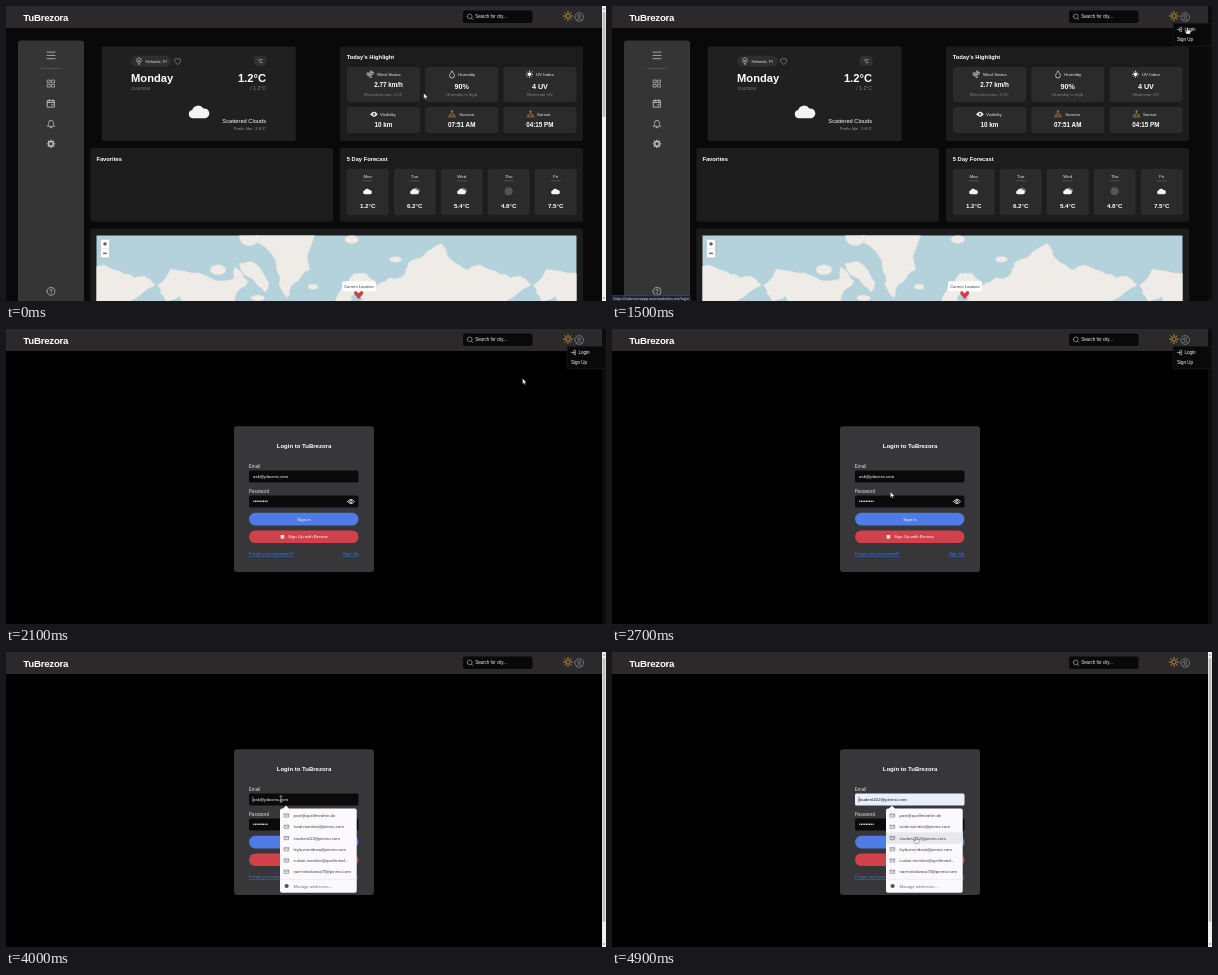
These frames come from a looping animation (600 px wide and 295 px high, 5 s). An HTML page:

```html
<!DOCTYPE html>
<html lang="en">
<head>
<meta charset="utf-8">
<title>Weather dashboard</title>
<style>
html, body { margin: 0; width: 100%; height: 100%; overflow: hidden; background: #000; }
svg { display: block; width: 100vw; height: 100vh; }
text { font-family: "Liberation Sans", Arial, sans-serif; white-space: pre; }
.ui { font-family: "Open Sans", "Noto Sans", sans-serif; }
</style>
</head>
<body>
<svg id="stage" viewBox="0 0 600 295" xmlns="http://www.w3.org/2000/svg"></svg>
<script>
const LOOP = 5000, STEP = 100;
const BRAND = "TuBrezora";
const MAILS = [
  "post@quellmirafen.de", "tural.meridov@pinmo.com", "student222@pinmo.com",
  "leyla.meridova@pinmo.com", "ruslan.meridov@quellmiraf...", "narmintalizova70@pinmo.com"
];
const HINT = "ask@placera.com";
const ROW_TOP = 157.9, ROW_H = 11.25;

// Drawing helpers that return SVG markup
const box = (x, y, w, h, fill, r = 0, more = "") =>
  `<rect x="${x}" y="${y}" width="${w}" height="${h}" rx="${r}" fill="${fill}" ${more}/>`;
const txt = (x, y, s, size, fill = "#fff", more = "") =>
  `<text x="${x}" y="${y}" font-size="${size}" fill="${fill}" ${more}>${s}</text>`;
const mid = 'text-anchor="middle"', end = 'text-anchor="end"', bold = 'font-weight="700"';
const dot = (x, y, r, fill) => `<circle cx="${x}" cy="${y}" r="${r}" fill="${fill}"/>`;
const icon = (x, y, d, stroke = "#ddd", w = .7, fill = "none", s = 1) =>
  `<path transform="translate(${x} ${y}) scale(${s})" d="${d}" fill="${fill}" stroke="${stroke}" stroke-width="${w}" stroke-linecap="round" stroke-linejoin="round"/>`;
const group = (id, body) => `<g id="${id}">${body}</g>`;
const ring = r => `M${-r} 0a${r} ${r} 0 1 0 ${2 * r} 0a${r} ${r} 0 1 0 ${-2 * r} 0`;

function rays(r1, r2, n = 8) {
  let d = "";
  for (let i = 0; i < n; i++) {
    const a = i * 2 * Math.PI / n, c = Math.cos(a), s = Math.sin(a);
    d += `M${(r1 * c).toFixed(2)} ${(r1 * s).toFixed(2)}L${(r2 * c).toFixed(2)} ${(r2 * s).toFixed(2)}`;
  }
  return d;
}

const CLOUD = "M-6.5 6a4.2 4.2 0 0 1-.3-8.3A6.2 6.2 0 0 1 4.4-3.6 4.9 4.9 0 0 1 6.4 6Z";
const EYE = "M-3.4 0Q0-4.6 3.4 0Q0 4.6-3.4 0Z";
const RISE = "M-3.4 2.8H3.4M-2.9 1.2H-2M2 1.2H2.9M-1.6 1.2a1.6 1.6 0 0 1 3.2 0M0-3.2V-1.5M-1-2.3L0-3.2L1-2.3";
const cloud = (x, y, s, fill = "#f4f4f4") => icon(x, y, CLOUD, "none", 0, fill, s);

// Rough outlines as longitude, latitude pairs
const EURASIA = [5,50, 5,62, 13,66, 20,70, 31,70, 41,67, 34,66, 44,66, 54,68.5, 67,69, 72,73, 87,75,
  104,77.7, 113,74, 130,71, 140,72.5, 160,69.7, 180,69, 190,66, 178,62.5, 163,58, 163,50];
const AMERICA = [-168,65.7, -156,71.3, -128,70, -95,68, -94,72, -81,67, -94,59, -94,50, -140,50, -147,60.8, -160,57, -165,62];
const GREENLAND = [-73,78, -54,71, -52,66, -43,60, -38,66, -22,71, -18,82, -66,82];
const BAFFIN = [-90,73, -78,73.5, -61,66.5, -65,62.5, -73,66];
const BALTIC = [17,58, 18,61, 25,65.5, 22,61, 30,59.5];
// Islands: longitude, latitude, half width, half height in px
const ISLES = [[60, 74, 6, 3], [-19, 65, 5, 2.6], [18, 78.5, 7, 4], [-110, 71, 8, 5], [-80, 79, 10, 9], [-72, 60, 7, 3]];
const PX = 1.044;

let seed = 7;
const rand = () => (seed = seed * 16807 % 2147483647) / 2147483647;
const merc = lat => Math.log(Math.tan(Math.PI / 4 + lat * Math.PI / 360));
const place = (lon, lat) => [353 + (lon - 25) * PX, 292 - (merc(lat) - merc(60)) * PX * 180 / Math.PI];

// Splits an edge and pushes its middle sideways, so that coasts look ragged
function ragged(a, b, depth) {
  if (!depth) return [b];
  const k = (rand() - .5) * .3;
  const m = [(a[0] + b[0]) / 2 - (b[1] - a[1]) * k, (a[1] + b[1]) / 2 + (b[0] - a[0]) * k];
  return [...ragged(a, m, depth - 1), ...ragged(m, b, depth - 1)];
}

function coast(line) {
  const points = [];
  for (let i = 0; i < line.length; i += 2) points.push(place(line[i], line[i + 1]));
  const edge = points.flatMap((p, i) => ragged(p, points[(i + 1) % points.length], 2));
  return "M" + edge.map(p => p.map(v => v.toFixed(1)).join(" ")).join("L") + "Z";
}

function map() {
  const land = 'fill="#efebe7" stroke="#d3d6d4" stroke-width=".4"';
  const isles = ISLES.map(([lon, lat, rx, ry]) => {
    const [x, y] = place(lon, lat);
    return `<ellipse cx="${x}" cy="${y}" rx="${rx}" ry="${ry}" ${land}/>`;
  }).join("");
  const world = `<path d="${[EURASIA, AMERICA, GREENLAND, BAFFIN].map(coast).join("")}" ${land}/>` + isles +
    `<path d="${coast(BALTIC)}" fill="#b3d2dc"/>`;
  const copies = [-1, 0, 1].map(k => `<g transform="translate(${k * 360 * PX} 0)">${world}</g>`).join("");
  return box(84.5, 222.5, 492.5, 80, "#1c1c1d", 2) +
    `<clipPath id="frame"><rect x="90.5" y="229.5" width="480" height="66"/></clipPath>` +
    `<g clip-path="url(#frame)">${box(90, 229, 481, 67, "#b3d2dc")}${copies}</g>` +
    box(94.3, 233.2, 9.4, 18.8, "#fff", 1, 'stroke="#a9a9a9" stroke-width=".6"') +
    `<path d="M94.5 242.6h9" stroke="#ccc" stroke-width=".4"/>` +
    icon(99, 237.9, "M-1.6 0H1.6M0-1.6V1.6", "#111", .8) + icon(99, 247.3, "M-1.6 0H1.6", "#111", .8) +
    icon(352.7, 287.5, "M0 5.2L-3.8 .8A2.2 2.2 0 0 1 0-2A2.2 2.2 0 0 1 3.8 .8Z", "#a92732", .4, "#d93a45") +
    `<path d="M350 284.5h5l-2.5 3z" fill="#fff"/>` +
    box(336, 275.2, 34, 10, "#fff", 1.8) + txt(353, 281.7, "Current Location", 4, "#333", mid);
}

function highlights() {
  const cards = [
    ["Wind Status", "2.77 km/h", "Wind direction: 274°", 30],
    ["Humidity", "90%", "Humidity is high", 33],
    ["UV Index", "4 UV", "Moderate UV", 32.5],
    ["Visibility", "10 km", "", 33],
    ["Sunrise", "07:51 AM", "", 34],
    ["Sunset", "04:15 PM", "", 33.5]
  ];
  return box(334, 40.5, 243, 94.5, "#1c1c1d", 2) +
    txt(340.7, 53.2, "Today's Highlight", 5.75, "#fff", bold) +
    cards.map(([name, value, note, dx], i) => {
      const x = 341 + i % 3 * 78.2, y = i < 3 ? 61 : 101, c = x + 36.5;
      const big = i === 1 || i === 2;
      return box(x, y, 73, note ? 35 : 26, "#2b2b2c", 3) +
        txt(x + dx, y + 8.7, name, 4.4, "#eee") +
        txt(c + (i ? 0 : 5), y + (big ? 21.7 : 20), value, big ? 7.2 : 6.3, "#fff", bold + " " + mid) +
        txt(c, y + 29.2, note, 4.4, "#858585", mid);
    }).join("") +
    icon(364, 68, "M-3-1H1.2a1 1 0 1 0-1-1.2M-3 .4H2.4a1.1 1.1 0 1 0-1-1.4M-2 1.8H.6a.9.9 0 1 1-.8 1.1", "#eee") +
    icon(446, 68.6, "M0-3.3C1.5-1.4 2.4-.2 2.4 1a2.4 2.4 0 0 1-4.8 0C-2.4-.2-1.5-1.4 0-3.3Z", "#eee") +
    dot(523.5, 68.2, 1.8, "#fff") + icon(523.5, 68.2, rays(2.5, 3.2), "#fff") +
    icon(368, 108.2, EYE, "#fff", .5, "#fff") + dot(368, 108.2, 1.2, "#2b2b2c") + dot(368, 108.2, .5, "#fff") +
    icon(446, 108, RISE, "#d6a83f", .6) + icon(524.5, 108, RISE, "#d6a83f", .6);
}

function forecast() {
  const days = [["Mon", "1.2°C"], ["Tue", "6.2°C"], ["Wed", "5.4°C"], ["Thu", "4.8°C"], ["Fri", "7.5°C"]];
  return box(334, 142, 243, 73.5, "#1c1c1d", 2) +
    txt(340.7, 155, "5 Day Forecast", 5.75, "#fff", bold) +
    days.map(([day, temp], i) => {
      const c = 361.7 + i * 47;
      const sky = i === 3 ? dot(c, 185.3, 4, "#555") :
        (i === 1 || i === 2 ? cloud(c + 1.6, 184, .36, "#777") : "") + cloud(c - .2, 185.6, .43);
      return box(c - 21, 162.7, 42, 46.5, "#2b2b2c", 3) +
        txt(c, 171.8, day, 4.4, "#eee", mid) +
        box(c - 5, 174.6, 10, .6, "#666") + sky +
        txt(c, 202, temp, 6.2, "#fff", bold + " " + mid);
    }).join("");
}

function today() {
  return box(95.7, 40.5, 194, 94.5, "#202021", 2) +
    box(125, 49.7, 40.5, 11, "#2e2e2f", 5.5) +
    icon(133, 55, "M0 3.2C-1.5 1.4-2.3.3-2.3-.8a2.3 2.3 0 0 1 4.6 0C2.3.3 1.5 1.4 0 3.2Z" + ring(.6), "#ddd", .6) +
    txt(139.5, 56.7, "Helsinki, FI", 4.3, "#eee") +
    icon(171.6, 55.2, "M0 3.2L-3 .2A2 2 0 0 1 0-2.2A2 2 0 0 1 3 .2Z", "#aaa", .6) +
    box(247.7, 50, 13, 10, "#303031", 4) + txt(254.2, 56.7, "°C", 4.5, "#eee", mid) +
    txt(125, 76.2, "Monday", 11.2, "#fff", bold) + txt(125, 83.7, "11/4/2024", 4.4, "#858585") +
    txt(260, 76.2, "1.2°C", 11.2, "#fff", bold + " " + end) + txt(260, 83.9, "/ 1.2°C", 5.1, "#858585", end) +
    cloud(193, 106.2, 1) +
    txt(260, 117.2, "Scattered Clouds", 5.7, "#fff", end) + txt(260, 124.2, "Feels like -1.8°C", 4.4, "#999", end);
}

function sidebar() {
  const g = "#c2c2c2", cell = "h2.7v2.7h-2.7z";
  return box(12, 34.6, 66, 270, "#353535", 3) +
    icon(45, 49.4, "M-4-3.3H4M-4 0H4M-4 3.3H4", g, .8) +
    box(35, 62.2, 20, .6, "#666") +
    icon(45, 77.6, ["M-3.5-3.5", "M.8-3.5", "M-3.5.8", "M.8.8"].map(m => m + cell).join(""), g) +
    icon(45, 97.6, "M-3.4-3H3.4V3.5H-3.4ZM-3.4-1.1H3.4M-1.8-4V-2.4M1.8-4V-2.4M.5 1.2H2", g, .9) +
    icon(45, 117.8, "M-3.4 2.2C-2.3 1-2.5.2-2.4-1a2.4 2.4 0 0 1 4.8 0C2.5.2 2.3 1 3.4 2.2ZM-.9 3.8H.9", g, .8) +
    icon(45, 137.8, ring(2.3) + rays(2.9, 3.7), g, 1.3) +
    icon(45, 285.3, ring(4) + "M-1.2-1a1.2 1.2 0 1 1 1.7 1.1Q0 .4 0 1M0 2.1V2.2", g);
}

const scrollbar = (id, thumb) => group(id,
  box(596, 0, 4, 295, "#f0f0f0") + box(596.7, 6, 2.6, thumb, "#bdbdbd", 1.2) +
  `<path d="M596.9 3.6h2.2l-1.1-1.8zM596.9 291.4h2.2l-1.1 1.8z" fill="#777"/>`);

const dashboard = () => group("dashboard",
  box(0, 0, 600, 295, "#090909") + sidebar() + today() + highlights() +
  box(84.5, 142, 242.5, 73.5, "#1c1c1d", 2) + txt(90.4, 155, "Favorites", 5.75, "#fff", bold) +
  forecast() + map());

const login = () => group("login",
  box(0, 0, 600, 295, "#000") + box(228, 97.3, 140, 145.7, "#373639", 3) +
  txt(298, 119, "Login to " + BRAND, 6, "#fff", bold + " " + mid) +
  txt(242.8, 138.6, "Email", 4.6, "#ddd") +
  box(243, 141.4, 109.5, 12.2, "#0a0a0a", 1.5, 'id="field"') +
  txt(247, 149.1, HINT, 4.4, "#fff", 'id="mail"') +
  box(246.7, 144.6, .5, 5.8, "#ddd", 0, 'id="caret"') +
  txt(242.8, 163.6, "Password", 4.6, "#ddd") +
  box(243, 166.4, 109.5, 12.2, "#0a0a0a", 1.5) + txt(247, 173.6, "•••••••••", 4.7) +
  icon(345, 172.5, EYE + ring(1.2), "#eee", .8) +
  box(243, 183.8, 109.5, 12.6, "#4f7be6", 6.3) + txt(298, 191.7, "Sign in", 4.4, "#fff", mid) +
  box(243, 201.5, 109.5, 12.6, "#d1414a", 6.3) + box(274.6, 206, 3.6, 3.6, "#dfe3df") +
  txt(282, 209.3, "Sign Up with Brenva", 4.4) +
  txt(242.8, 226.3, "Forgot your password?", 4.4, "#4179e0", 'text-decoration="underline"') +
  txt(352.5, 226.3, "Sign Up", 4.4, "#4179e0", 'text-decoration="underline" ' + end));

const header = () =>
  box(0, 0, 596, 22, "#2b292a") +
  txt(17.3, 15.1, BRAND, 9.7, "#fff", bold + ' letter-spacing="-.25"') +
  box(457, 4.5, 69.5, 12.5, "#090909", 2) +
  icon(463.7, 10.4, ring(2.4) + "M1.8 1.8L3.2 3.2", "#bbb", .6) +
  txt(469.2, 12.3, "Search for city...", 4.45, "#eee") +
  icon(562, 10, ring(2.2) + rays(3.4, 4.6), "#d8a840", .8) +
  group("user", icon(573.2, 11, ring(4.4) + "M-1.5-1a1.5 1.5 0 1 0 3 0a1.5 1.5 0 1 0-3 0M-2.8 3.2Q0 .2 2.8 3.2", "#8190a3"));

const menu = () => group("menu",
  box(596, 0, 4, 295, "#0e0c0b") + box(561.2, 17.2, 38.6, 22.8, "#090909", 1, 'stroke="#242424" stroke-width=".5"') +
  icon(567.6, 23.5, "M-2.3 0H.8M-.4-1.2L.8 0L-.4 1.2M.4-2.1H2V2.1H.4", "#ddd", .6) +
  txt(572.4, 25.2, "Login", 4.5) + txt(564.9, 35.2, "Sign Up", 4.5));

const status = () => group("status",
  box(-.5, 289.6, 78.5, 6, "#1d2136", .5, 'stroke="#4a5578" stroke-width=".5"') +
  txt(1.3, 293.8, "https://tubrezoraapp.azurewebsites.net/login", 3.6, "#e3e6f0", 'class="ui"'));

const popup = () => group("popup",
  `<path d="M276.8 157l3.2-3.4l3.2 3.4z" fill="#fbf9fd"/>` + box(274, 156.5, 76.7, 84.3, "#fbf9fd", 2) +
  box(274, 0, 76.7, ROW_H, "#e8e7eb", 0, 'id="hover"') +
  MAILS.map((m, i) => {
    const y = ROW_TOP + ROW_H * (i + .5);
    return icon(280.6, y, "M-2.1-1.6H2.1V1.6H-2.1ZM-2.1-1.3L0 .3L2.1-1.3", "#555", .5) +
      txt(287.5, y + 1.5, m, 4.05, "#2c2b30", 'class="ui"');
  }).join("") +
  box(274, 226.9, 76.7, .5, "#dedce2") + dot(280.6, 234, 2.1, "#56555b") +
  txt(287.5, 235.5, "Manage addresses...", 4.05, "#6a6970", 'class="ui"'));

const cursors = () =>
  group("arrow", icon(0, 0, "M0 0V5.4L1.3 4.3L2.1 6.2L3 5.8L2.2 4H3.9Z", "#222", .35, "#fff")) +
  group("hand", icon(0, 0, "M-.6 .6a.6.6 0 0 1 1.2 0V2.6L2.8 3.1Q3.4 3.3 3.2 4.2L2.7 6.4H-.8L-2.3 4.2Q-2.4 3.3-1.5 3.5L-.6 4.1Z", "#222", .35, "#fff")) +
  group("beam", icon(0, 0, "M-1-2.9H1M0-2.9V2.9M-1 2.9H1", "#ddd", .6));

const stage = document.getElementById("stage");
stage.innerHTML = dashboard() + login() + header() + scrollbar("longBar", 105) + scrollbar("shortBar", 264) +
  menu() + status() + popup() + cursors();

const el = id => document.getElementById(id);
const show = (id, on) => { el(id).style.display = on ? "" : "none"; };

// Pointer moves: start, end, target x, target y
const MOVES = [
  [100, 750, 576.4, 10], [1000, 1400, 575.4, 21.5], [1900, 2600, 278.4, 163],
  [3300, 3700, 275, 147], [4200, 4700, 304, 185]
];

function pointer(t) {
  let x = 417.8, y = 87.3;
  for (const [from, to, tx, ty] of MOVES) {
    const k = Math.min(1, Math.max(0, (t - from) / (to - from))), e = k * k * (3 - 2 * k);
    x += (tx - x) * e;
    y += (ty - y) * e;
  }
  return [x, y];
}

function render(time) {
  const t = Math.floor(time % LOOP / STEP) * STEP;
  const [x, y] = pointer(t);
  const onLogin = t >= 1600, menuOpen = t >= 1000 && t < 3300, listOpen = t >= 3800;
  const row = listOpen && y > ROW_TOP ? Math.floor((y - ROW_TOP) / ROW_H) : -1;
  const overLink = menuOpen && x > 561 && y > 18.5;
  const overField = onLogin && x > 243 && x < 352 && row < 0 &&
    ((y > 141 && y < 154) || (y > 166.4 && y < 178.6));

  show("dashboard", !onLogin);
  show("login", onLogin);
  show("longBar", !menuOpen && !onLogin);
  show("shortBar", !menuOpen && onLogin);
  show("menu", menuOpen);
  show("status", t >= 1300 && t < 2100);
  show("user", !(x > 568 && y < 16));
  show("popup", listOpen);
  show("hover", row >= 0);
  show("caret", t >= 3700);
  if (row >= 0) el("hover").setAttribute("y", ROW_TOP + row * ROW_H);
  el("field").setAttribute("fill", row >= 0 ? "#e8f0fd" : "#0a0a0a");
  el("mail").setAttribute("fill", row >= 0 ? "#151515" : "#fff");
  el("mail").textContent = row >= 0 ? MAILS[row] : HINT;
  el("caret").setAttribute("fill", row >= 0 ? "#222" : "#ddd");

  const kind = overLink || row >= 0 ? "hand" : overField ? "beam" : "arrow";
  for (const id of ["arrow", "hand", "beam"]) show(id, id === kind);
  el(kind).setAttribute("transform", `translate(${x.toFixed(2)} ${y.toFixed(2)})`);
}

const start = performance.now();
function tick() {
  render(performance.now() - start);
  requestAnimationFrame(tick);
}
render(0);
requestAnimationFrame(tick);
</script>
</body>
</html>
```
